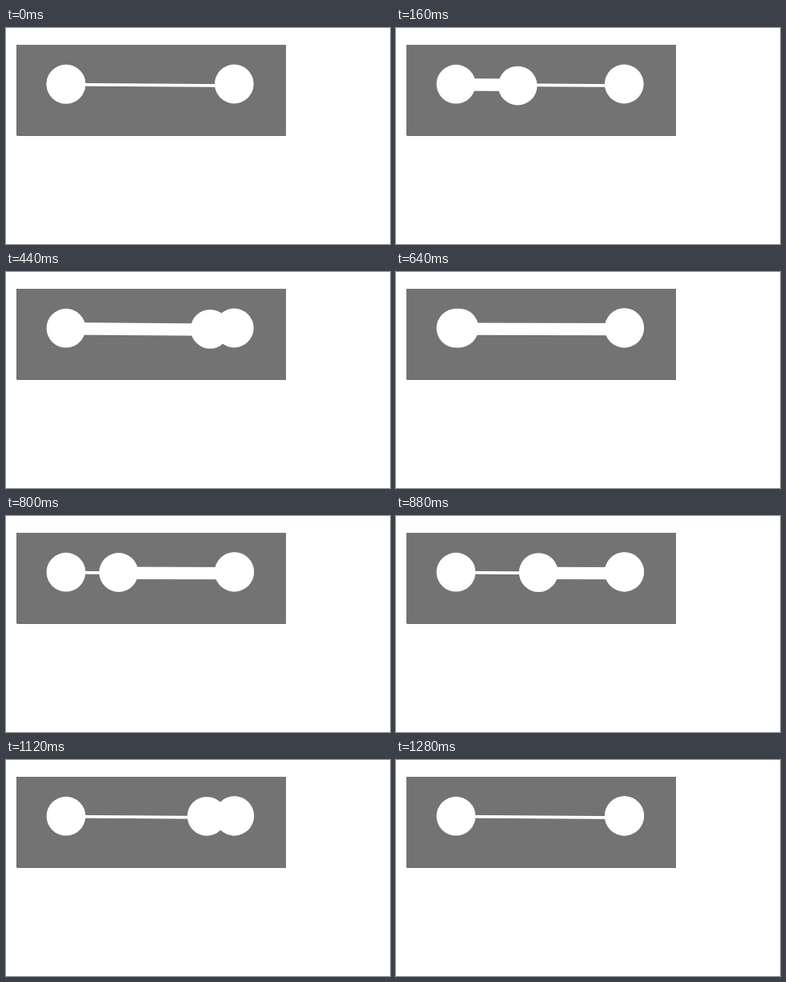
Animation of 480x270 px, one loop 1320 ms. Source, as an HTML page:

```html
<!DOCTYPE html>
<html lang="en">
<head>
<meta charset="utf-8">
<title>Toggle track</title>
<style>
  html, body { margin: 0; width: 100%; height: 100%; overflow: hidden; background: #fff; }
  svg { display: block; width: 480px; height: 270px; fill: #fff; stroke: none; }
  line { stroke: #fff; }
</style>
</head>
<body>
<svg viewBox="0 0 480 270">
  <path fill="#737373" d="M13 21H350V135H14L13 134Z"/>
  <line x1="75" y1="70.6" x2="285" y2="72.1" stroke-width="3.7"/>
  <line id="bar" stroke-width="15.4"/>
  <circle cx="75" cy="70.2" r="24.4"/>
  <circle cx="285.2" cy="70" r="24.4"/>
  <circle id="cap" cx="285.5" cy="69.8" r="24.6"/>
  <circle id="ball" r="24.4"/>
</svg>
<script>
const LOOP = 1320, STEP = 40, TURN = 600;
const [bar, cap, ball] = ['bar', 'cap', 'ball'].map(id => document.getElementById(id));

// time, x and speed in px per step
const back = [
  [600, 75.5, 1], [640, 78.8, 9], [800, 140.8, 17.5],
  [960, 212, 14], [1120, 251, 9.2], [1280, 285.4, 5]
];

function set(el, attrs) {
  for (const key in attrs) el.setAttribute(key, attrs[key]);
}

function hermite(keys, t) {
  let i = 0;
  while (i < keys.length - 2 && t > keys[i + 1][0]) i++;
  const [t0, x0, v0] = keys[i], [t1, x1, v1] = keys[i + 1];
  const span = t1 - t0, u = (t - t0) / span, w = 1 - u, k = span / STEP;
  return x0 * (1 + 2 * u) * w * w + v0 * k * u * w * w
       + x1 * u * u * (3 - 2 * u) - v1 * k * u * u * w;
}

// The ball first fills the track from the left.
function fill(t) {
  const p = 1 - Math.pow(1 - t / TURN, 1.475);
  const x = 75 + 210 * p;
  const y = 70.2 + 2.3 * Math.sin(Math.PI * Math.pow(p, 1.2));
  set(ball, { cx: x, cy: y });
  set(bar, { x1: 75, y1: 70.7, x2: x, y2: 70.7 + (x - 75) * 0.008 });
}

// Then it empties the track toward the right.
function empty(t) {
  const x = hermite(back, t), p = (x - 75) / 210;
  set(ball, { cx: x, cy: 70 + 0.6 * Math.sin(Math.PI * p) });
  set(bar, { x1: x, y1: 71.1 + 0.5 * p, x2: 285.5, y2: 71.6 });
}

function draw(now) {
  const t = Math.floor((now % LOOP) / STEP) * STEP;
  const filling = t < TURN;
  (filling ? fill : empty)(t);
  cap.style.display = filling ? 'none' : '';
}

let start;
function tick(now) {
  start ??= now;
  draw(now - start);
  requestAnimationFrame(tick);
}
draw(0);
requestAnimationFrame(tick);
</script>
</body>
</html>
```
